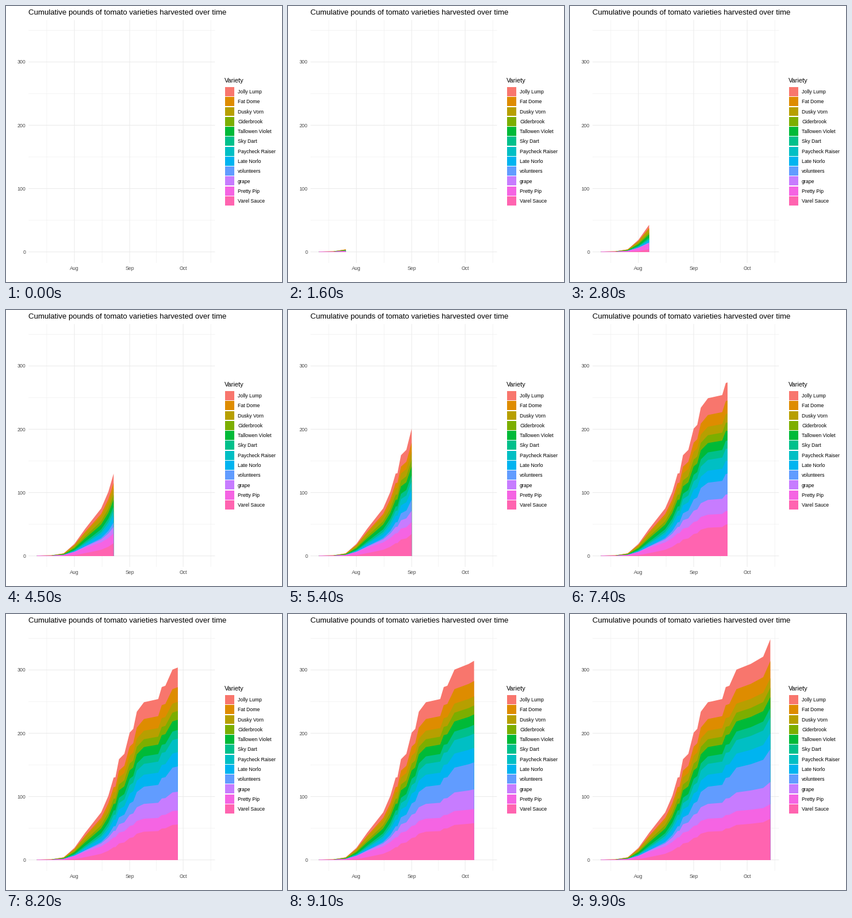
Write a matplotlib script that moves like this. It is 480 px wide and 480 px high and loops after 10000 ms.

```python
import numpy as np
import matplotlib.pyplot as plt
from matplotlib.animation import FuncAnimation
from matplotlib.patches import Polygon, Rectangle

plt.rcParams["font.family"] = "Liberation Sans"

SIZE, DPI = 480, 72
FRAMES, INTERVAL = 100, 100
LAST_DAY = 95  # days since 11 July

# name: colour, pounds at the end, growth exponent against the total
VARIETIES = {
    "Jolly Lump": ("#F8766D", 34.5, .85),
    "Fat Dome": ("#DE8C00", 27, 1.2),
    "Dusky Vorn": ("#B79F00", 15, .4),
    "Ciderbrook": ("#7CAE00", 15, .64),
    "Tallowen Violet": ("#00BA38", 17, .5),
    "Sky Dart": ("#00C08B", 15, .77),
    "Paycheck Raiser": ("#00BFC4", 25, 1.2),
    "Late Norlo": ("#00B4F0", 25, .9),
    "volunteers": ("#619CFF", 52, 2),
    "grape": ("#C77CFF", 35, 1.27),
    "Pretty Pip": ("#F564E3", 23, .4),
    "Varel Sauce": ("#FF64B0", 65, 1.2),
}

# (day, total pounds) at the main bends of the harvest curve
BENDS = [
    (0, .5), (8, .8), (15, 4), (21, 19), (27, 42.7), (36, 75), (40, 101),
    (43, 130), (44, 130.5), (46, 159), (49, 167.5), (52, 201), (54, 207),
    (56, 234), (60, 249), (68, 254), (70, 273), (72, 275), (76, 300.5),
    (84, 309.5), (91, 321), (95, 348.5),
]


def px(day):
    return 53.9 + 3.1 * day


def py(pounds):
    return 427.6 - 1.101 * pounds


fig = plt.figure(figsize=(SIZE / DPI, SIZE / DPI), dpi=DPI, facecolor="white")
ax = fig.add_axes([0, 0, 1, 1])
ax.set_xlim(0, SIZE)
ax.set_ylim(SIZE, 0)
ax.axis("off")


def grid(xs, ys, width):
    style = dict(color="#EBEBEB", lw=width, zorder=1, solid_capstyle="butt",
                 snap=False)
    for x in xs:
        ax.plot([x, x], [24.5, 446.8], **style)
    for y in ys:
        ax.plot([39.2, 363.4], [y, y], **style)


def label(x, y, text, size=8.8, color="black", ha="left"):
    ax.text(x, y, text, fontsize=size, color=color, ha=ha, va="baseline")


months = {"Aug": 21, "Sep": 52, "Oct": 82}
grid([px(d) for d in (5.5, 36.5, 67, 97.5)],
     [py(v) for v in range(50, 351, 100)], .53)
grid([px(d) for d in months.values()],
     [py(v) for v in range(0, 301, 100)], 1.07)

label(39, 15, "Cumulative pounds of tomato varieties harvested over time", 13.2)
for name, day in months.items():
    label(px(day), 459, name, color="#4D4D4D", ha="center")
for v in range(0, 301, 100):
    label(34.3, py(v) + 3.2, str(v), color="#4D4D4D", ha="right")

label(380, 133, "Variety", 11)
for i, (name, (color, *_)) in enumerate(VARIETIES.items()):
    mid = 148.9 + 17.28 * i
    top, bottom = round(mid - 7.93), round(mid + 7.93)
    ax.add_patch(Rectangle((381, top), 16, bottom - top, fc=color, ec="none"))
    label(403, mid + 3.1, name)

colors, pounds, powers = zip(*VARIETIES.values())
days = np.arange(LAST_DAY + 1)
total = np.interp(days, *zip(*BENDS))
growth = np.array([w * (total / total[-1]) ** p
                   for w, p in zip(pounds, powers)])
harvest = growth * total / growth.sum(axis=0)
tops = np.cumsum(harvest[::-1], axis=0)[::-1]

# each band reaches the baseline and is covered by the ones below it
FLOOR = 428
bands = [ax.add_patch(Polygon([(px(0), FLOOR)] * 3, fc=color, ec="none", lw=0,
                              snap=False, zorder=3 + i * .1))
         for i, color in enumerate(colors)]


def update(frame):
    day = round(frame * LAST_DAY / (FRAMES - 1))
    xs = px(days[:day + 1])
    for band, top in zip(bands, tops):
        band.set_visible(day > 0)
        outline = np.column_stack([xs, py(top[:day + 1])])
        band.set_xy(np.vstack([outline, [(px(day), FLOOR), (px(0), FLOOR)]]))
    return bands


anim = FuncAnimation(fig, update, frames=FRAMES, interval=INTERVAL,
                     repeat=True, repeat_delay=0, blit=False)
plt.show()
```
